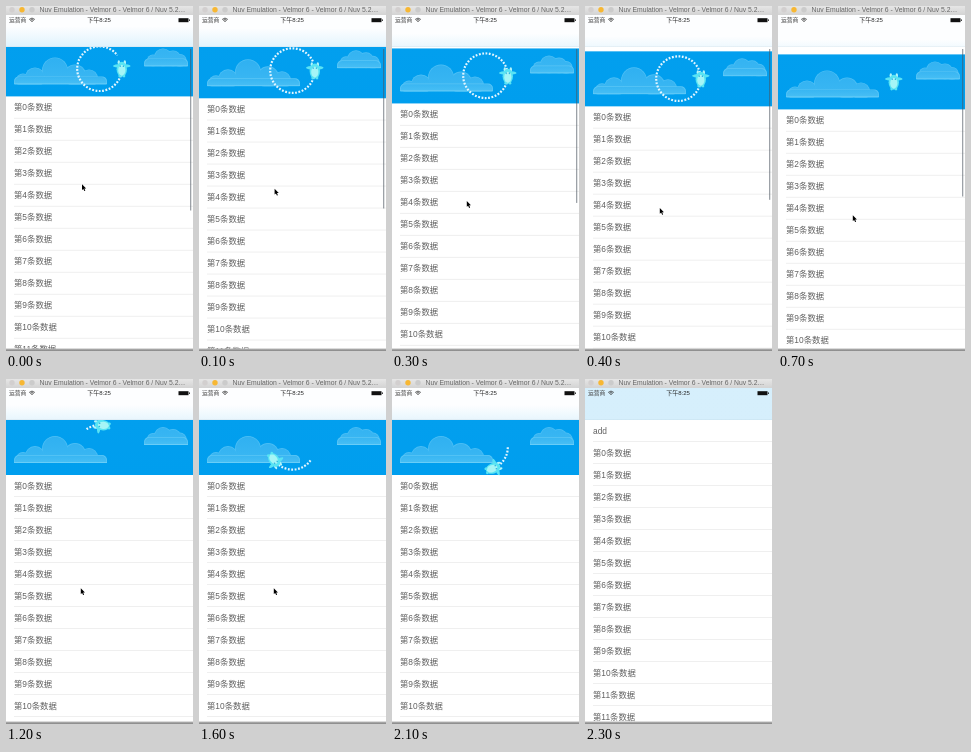
An HTML page with a canvas for the animation above (2.4 s loop, 187x345 px).

```html
<!DOCTYPE html>
<html lang="zh">
<head>
<meta charset="utf-8">
<style>
html, body { margin: 0; width: 187px; height: 345px; overflow: hidden; background: #fff; }
canvas { display: block; width: 187px; height: 345px; }
</style>
</head>
<body>
<canvas id="stage"></canvas>
<script>
const W = 187, H = 345, NAV = 41, BANNER = 55, ROW = 22, LOOP = 2400;
const TAU = Math.PI * 2;
const FONT = '"Liberation Sans", "Noto Sans CJK SC", "Noto Sans CJK", sans-serif';
const canvas = document.getElementById('stage');
const c = canvas.getContext('2d');
const ratio = window.devicePixelRatio || 1;
canvas.width = W * ratio;
canvas.height = H * ratio;

const clamp = v => Math.max(0, Math.min(1, v));
const easeOut = v => 1 - (1 - clamp(v)) ** 2;
const pulled = t => clamp(t / 500) ** 1.2;

function rect(x, y, w, h, fill) {
  c.fillStyle = fill;
  c.fillRect(x, y, w, h);
}

function oval(x, y, rx, ry, fill) {
  c.fillStyle = fill;
  c.beginPath();
  c.ellipse(x, y, rx, ry, 0, 0, TAU);
  c.fill();
}

function label(text, x, y, size, color, align = 'left') {
  c.font = `${size}px ${FONT}`;
  c.textAlign = align;
  c.textBaseline = 'alphabetic';
  c.fillStyle = color;
  c.fillText(text, x, y);
}

function fade(y0, y1, from, to) {
  const g = c.createLinearGradient(0, y0, 0, y1);
  g.addColorStop(0, from);
  g.addColorStop(1, to);
  return g;
}

// Each bump is [x, y, radius]; a light rim surrounds the merged inside,
// and a rounded strip with a bright foot lies in front.
function cloud(left, right, base, bumps) {
  const strip = (inset, fill) => {
    c.fillStyle = fill;
    c.beginPath();
    c.roundRect(left + inset, base - 8 + inset, right - left - 2 * inset, 8 - inset, [5, 5, 1, 1]);
    c.fill();
  };
  c.save();
  c.beginPath();
  c.rect(left, 0, right - left, base);
  c.clip();
  const shade = fade(base - 28, base, '#2fb0f1', '#3cb8f3');
  for (const [x, y, r] of bumps) oval(x, y, r, r, '#4fc0f5');
  for (const [x, y, r] of bumps) oval(x, y, r - 0.7, r - 0.7, shade);
  strip(0, '#5ac6f6');
  strip(0.7, fade(base - 8, base, '#37b5f2', '#48bff5'));
  rect(left, base - 1, right - left, 1, '#69cdf7');
  c.restore();
}

function flyer(x, y, turn) {
  c.save();
  c.translate(x, y);
  c.rotate(turn);
  oval(0, -2.8, 8.8, 2, '#5ae3f4');
  oval(-3, -6.2, 1.2, 2.2, '#b4f5fa');
  oval(3, -6.2, 1.2, 2.2, '#b4f5fa');
  oval(0, 0.5, 5.2, 7.5, '#58e4f3');
  oval(0, 1.5, 3.6, 5.5, '#a5f5f6');
  oval(-1.6, -2.5, 0.7, 0.9, '#2fb5e2');
  oval(1.6, -2.5, 0.7, 0.9, '#2fb5e2');
  oval(-2.2, 7.4, 1.3, 1.4, '#58e4f3');
  oval(2.2, 7.4, 1.3, 1.4, '#58e4f3');
  c.restore();
}

function banner(top, t) {
  c.save();
  c.beginPath();
  c.rect(0, NAV, W, H);
  c.clip();
  c.translate(0, top);
  rect(0, 0, W, BANNER, fade(0, BANNER, '#029fee', '#009eee'));
  cloud(8, 101, 43, [[17, 39, 7], [29, 36, 10], [83, 37, 9], [69, 34, 11], [49, 29, 13]]);
  cloud(138, 182, 25, [[147, 19, 6], [174, 19, 6.5], [167, 17, 8], [157, 16, 9]]);

  // Pulling completes the ring. In flight the trail's start
  // catches up with its end at the close of every turn.
  const p = Math.max(0, t - 715) / 632 % 1;
  const from = Math.max(0, 1.5 * p - 0.5);
  const to = t < 700 ? clamp((top + BANNER - NAV) / BANNER) : p;
  const cx = 93.5, cy = 27.3, r = 22.3;
  c.beginPath();
  c.arc(cx, cy, r, from * TAU, to * TAU);
  c.strokeStyle = '#e4f6ff';
  c.lineWidth = 2.2;
  c.setLineDash([1.8, 1.57]);
  if (to > from) c.stroke();
  c.setLineDash([]);
  const a = p * TAU;
  flyer(cx + r * Math.cos(a), cy + r * Math.sin(a), a);
  c.restore();
}

function rows(start, added) {
  const names = Array.from({ length: 12 }, (_, i) => `第${i}条数据`);
  if (added) names.unshift('add');
  names.push('第11条数据');
  names.forEach((name, i) => {
    const y = start + i * ROW;
    label(name, 8, y + 13.9, 8.4, '#606060');
    rect(8, y + ROW - 0.5, W - 8, 0.5, '#dedede');
  });
}

function bars(top) {
  rect(0, 9, W, NAV - 9, '#fdfeff');
  rect(0, 9, W, NAV - 9, fade(top - 15, top + 12, 'rgba(10,160,236,0)', 'rgba(10,160,236,.16)'));
  rect(0, NAV - 0.5, W, 0.5, 'rgba(170,190,200,.3)');

  label('运营商', 3, 16.4, 5.8, '#444');
  label('下午8:25', 93, 16.4, 6, '#222', 'center');
  c.strokeStyle = '#333';
  c.lineWidth = 0.8;
  for (const r of [1.2, 2.6, 4]) {
    c.beginPath();
    c.arc(26, 16.3, r, -Math.PI * 0.75, -Math.PI * 0.25);
    c.stroke();
  }
  rect(172.5, 12.2, 10, 4, '#111');
  rect(183, 13.4, 0.8, 1.6, '#111');

  rect(0, 0, W, 9, fade(0, 9, '#e6e6e6', '#d3d3d3'));
  oval(6, 3.8, 2.7, 2.7, '#d2cfcf');
  oval(16, 3.8, 2.7, 2.7, '#f7b733');
  oval(26, 3.8, 2.7, 2.7, '#cbcbcb');
  label('Nuv Emulation - Velmor 6 - Velmor 6 / Nuv 5.2…', 33.5, 6.3, 6.8, '#666');
}

function cursor(x, y) {
  c.save();
  c.translate(x, y);
  c.scale(0.85, 0.85);
  c.beginPath();
  [[0, 0], [0, 6.8], [1.6, 5.4], [2.7, 8], [3.9, 7.5], [2.8, 5], [4.9, 5]].forEach(q => c.lineTo(...q));
  c.closePath();
  c.strokeStyle = '#fff';
  c.lineWidth = 1;
  c.stroke();
  c.fillStyle = '#000';
  c.fill();
  c.restore();
}

function bottomEdge(t) {
  if (t < 700) return 90.4 + 13 * pulled(t);
  if (t < 2100) return 103.4 - 7.4 * easeOut((t - 700) / 400);
  return 96 - 55 * clamp((t - 2100) / 200);
}

function draw(t) {
  const pull = pulled(t);
  const edge = bottomEdge(t);
  const top = edge - BANNER;
  c.setTransform(ratio, 0, 0, ratio, 0, 0);
  rect(0, 0, W, H, '#fff');
  rows(edge, t >= 2200);
  banner(top, t);
  bars(top);

  c.globalAlpha = clamp((1100 - t) / 300);
  rect(184, 43, 1.3, 161.5 - 14 * pull, 'rgba(75,85,95,.55)');
  c.globalAlpha = 1;

  if (t < 1900) cursor(76 - 1.2 * clamp(t / 300), 178.3 + 31 * pull);
  rect(0, 342.5, W, 2.5, fade(342, 345, '#c4c4c4', '#858585'));
}

const begin = performance.now();
function tick() {
  const t = (performance.now() - begin) % LOOP;
  draw(Math.floor(t / 100) * 100);
  requestAnimationFrame(tick);
}
tick();
</script>
</body>
</html>
```
